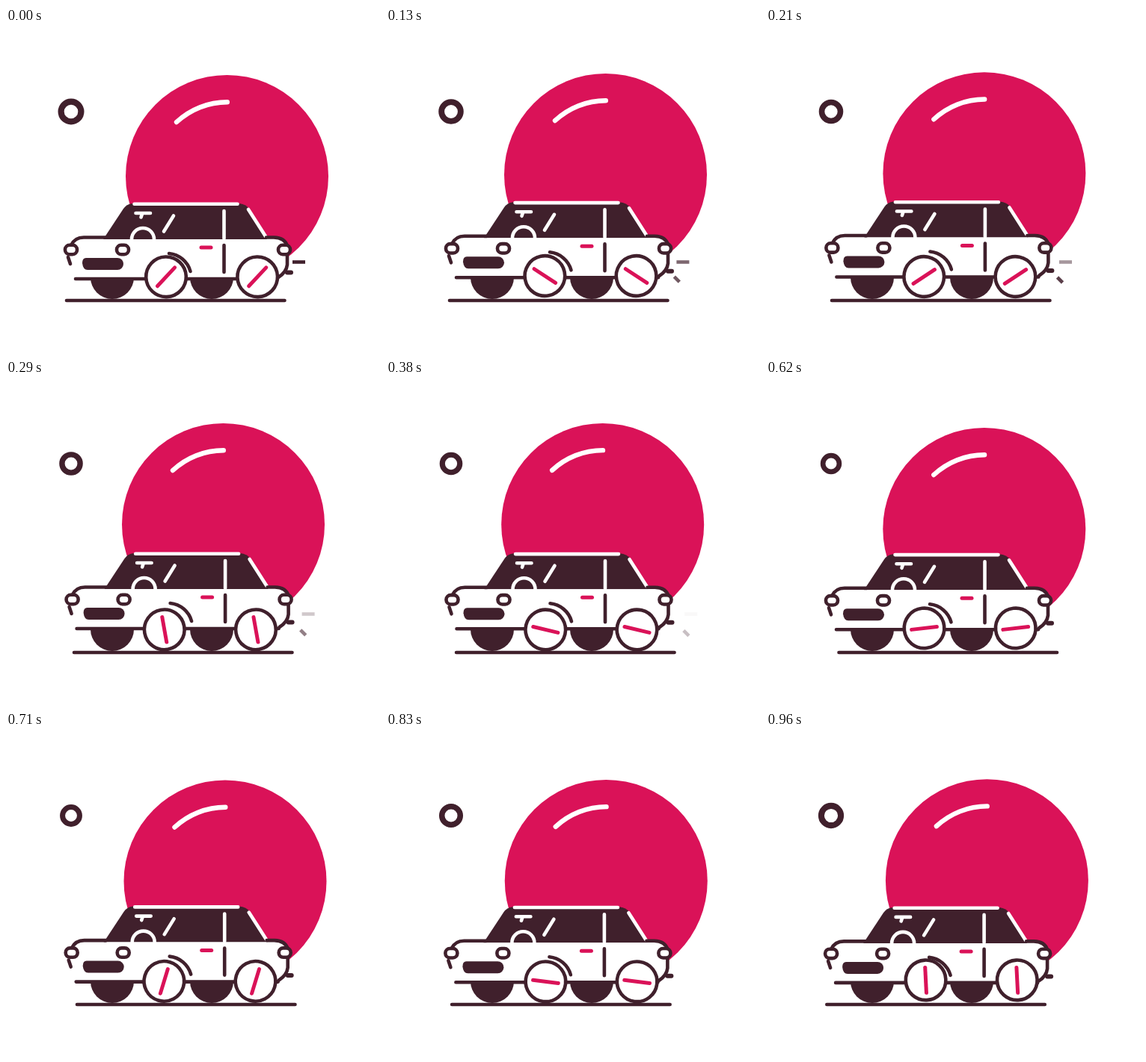
Animation, 500 px wide and 434 px high, one loop 1000 ms. Source, as an HTML page:

```html
<!DOCTYPE html>
<html lang="en">
<head>
<meta charset="utf-8">
<title>Car</title>
<style>
html, body { margin: 0; width: 100%; height: 100%; overflow: hidden; background: #fff; }
svg { display: block; width: 100%; height: 100%; }
.dark, .white, .pink { fill: none; stroke-width: 4.6; stroke-linecap: round; stroke-linejoin: round; }
.dark { stroke: #40202c; }
.white { stroke: #fff; }
.pink { stroke: #da1258; stroke-width: 5; }
.fill { fill: #40202c; }
.paper { fill: #fff; }
</style>
</head>
<body>
<svg viewBox="0 0 500 434">
  <defs>
    <rect id="lamp" class="dark paper" x="-8" y="-6.2" width="16" height="12.4" rx="6"/>
    <g id="wheel">
      <circle class="dark paper" r="26.8"/>
      <path class="pink" d="M-17 0H17"/>
    </g>
  </defs>

  <circle id="ring" class="dark" cx="87" cy="112"/>
  <g id="ball">
    <circle r="135.5" fill="#da1258"/>
    <path class="white" stroke-width="6" style="stroke-width:6.4" d="M-67.5 -72.5A99.3 99.3 0 0 1 .3 -99.3"/>
  </g>

  <path id="puff" class="dark" style="stroke-linecap:butt" d="M383 313.5H400"/>
  <path id="spark" class="dark" style="stroke-linecap:butt" d="M379 332L386 339"/>

  <circle class="fill" cx="142" cy="334" r="29"/>
  <circle class="fill" cx="275" cy="334" r="29"/>
  <path id="ground" class="dark" d="M81 365H372.5"/>

  <g id="car">
    <path class="paper" d="M80 297C82 285 92 280 104 280H360Q375 282 376 296V316Q375 331 364 336H92Z"/>
    <path class="fill" d="M130 283L157 242Q161 236 169 235H311Q321 236 325 242L349 283Z"/>
    <path class="white" d="M171.500 235.800H309.500M324 243L347 279M291.500 245V282M224 251.500L211 272.500M173.500 248H193M182 249L180.500 253.500M168 283A15 15 0 0 1 198 283"/>
    <path class="paper" d="M134 283H358V288H134Z"/>
    <path class="dark" d="M87 291Q92 280.500 104 280.500H133M348 280.500H358Q373 281 376 292M83 307L86 316M376 304V317Q375 327 364 334M93 336H363M218 302A33 33 0 0 1 246.500 326M291.500 291V327"/>
    <path class="dark" style="stroke-width:6" d="M376 327.500H381"/>
    <path class="fill" d="M107 308H149A8 8 0 0 1 149 324H109Q103 324 102 315Q102 308 107 308Z"/>
    <path class="pink" d="M261 294H274"/>
    <use href="#lamp" x="87" y="297"/>
    <use href="#lamp" x="156" y="297"/>
    <use href="#lamp" x="372" y="297"/>
  </g>

  <use id="front" href="#wheel"/>
  <use id="rear" href="#wheel"/>
</svg>
<script>
const STEPS = 24;
const keys = [0, 3, 7, 11, 15, 17, 23];
const tracks = {
  ballX: [295.5, 293.5, 290.5, 289.5, 291.8, 293, 295.4],
  ballY: [198.5, 196.5, 193.5, 194.4, 199.5, 200, 198.7],
  carX: [0, 1, 1.6, 1.3, 1, 0.7, 0.1],
  carY: [0, -1.7, -3, -2.2, -1.7, -1.4, -0.1],
  ground: [0, 4, 10, 15.5, 16.5, 14, 0.3]
};
const el = id => document.getElementById(id);
const move = (id, x, y, turn = 0) =>
  el(id).setAttribute("transform", `translate(${x} ${y}) rotate(${turn})`);

// Smooth periodic curve through the keys
function curve(values, t) {
  const n = keys.length;
  const time = i => keys[(i + n) % n] + Math.floor(i / n) * STEPS;
  const value = i => values[(i + n) % n];
  const slope = i => (value(i + 1) - value(i - 1)) / (time(i + 1) - time(i - 1));
  let i = n - 1;
  while (keys[i] > t) i--;
  const span = time(i + 1) - time(i), s = (t - time(i)) / span, r = 1 - s;
  return value(i) * r * r * (1 + 2 * s) + value(i + 1) * s * s * (1 + 2 * r) +
    span * s * r * (slope(i) * r - slope(i + 1) * s);
}

function fade(id, amount) {
  el(id).setAttribute("opacity", Math.max(0, amount));
}

function draw(now) {
  // 24 poses per second
  const k = Math.floor(now % 1000 * 0.024 + 0.13) % STEPS;
  const at = name => curve(tracks[name], k);

  move("ball", at("ballX"), at("ballY"));
  move("car", at("carX"), at("carY"));
  move("ground", at("ground"), 0);

  const size = 1 - 0.2 * (k < 14.4 ? k / 14.4 : (24 - k) / 9.6);
  el("ring").setAttribute("r", 13.4 * size);
  el("ring").style.strokeWidth = 8.2 * size;

  const turn = -33.3 * k, a = turn * Math.PI / 180;
  const dx = 1.4 * Math.cos(a), dy = 1.3 * Math.sin(a);
  move("front", 212.6 + dx, 333.3 + dy, turn + 133);
  move("rear", 334.8 + dx, 333.3 + dy, turn + 133);

  move("puff", 1.8 * k, 0);
  fade("puff", 1 - k / 9.3);
  move("spark", 2.1 * k, 0.4 * k);
  fade("spark", Math.min(k / 4, (11 - k) / 7));
  requestAnimationFrame(draw);
}
draw(0);
</script>
</body>
</html>
```
